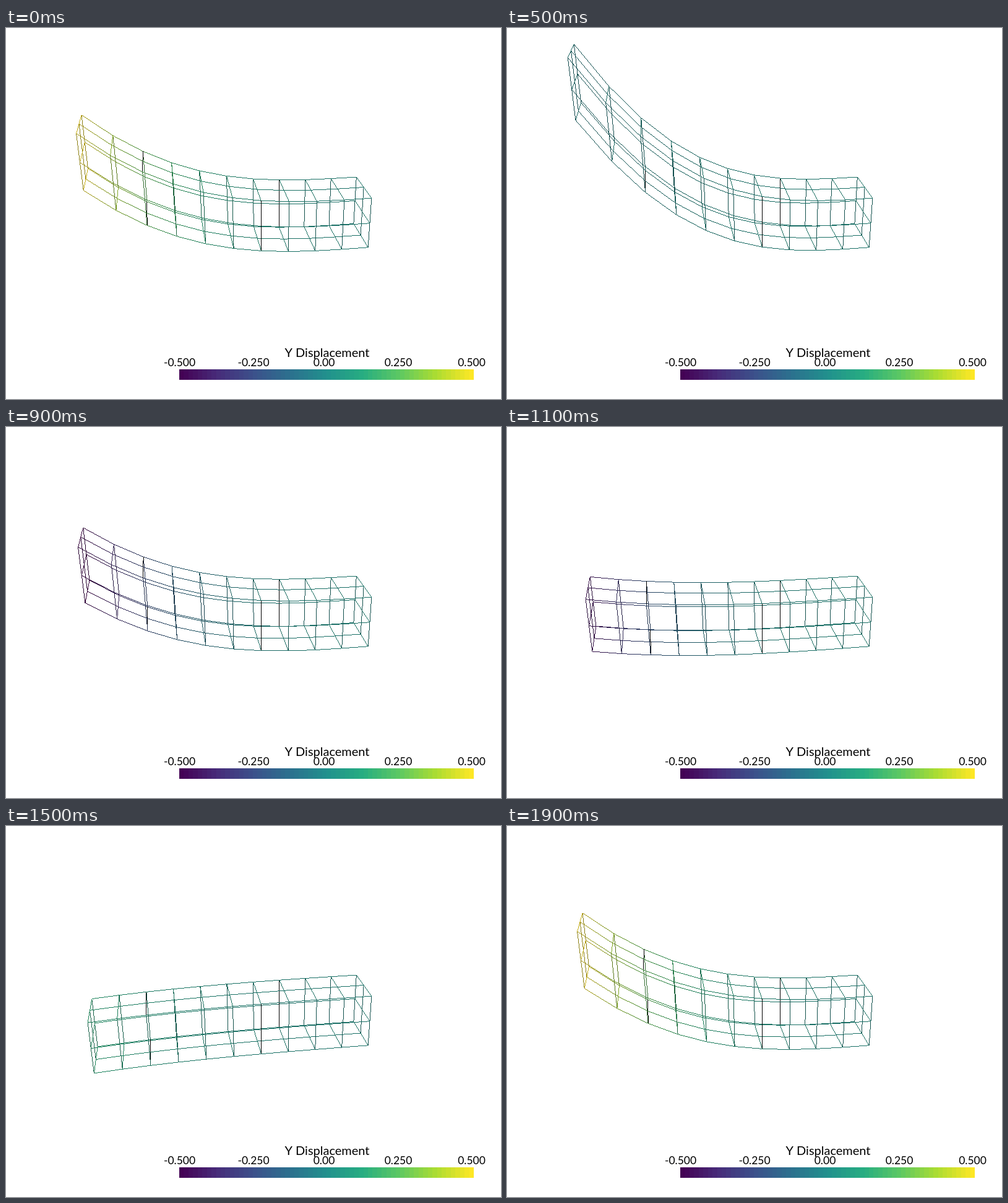
These frames come from a looping animation (800 px wide and 600 px high, 2000 ms). An HTML page with a canvas:

```html
<!DOCTYPE html>
<html lang="en">
<head>
<meta charset="utf-8">
<title>Beam displacement</title>
<style>
  html, body { margin: 0; width: 100%; height: 100%; overflow: hidden; background: #fff; }
  canvas { display: block; }
</style>
</head>
<body>
<canvas id="stage" width="800" height="600"></canvas>
<script>
const ctx = document.getElementById('stage').getContext('2d');
const W = 800, VIEW_H = 500;
const STEPS = 20, STEP_MS = 100;

const dot = (a, b) => a[0] * b[0] + a[1] * b[1] + a[2] * b[2];
const sub = (a, b) => a.map((v, i) => v - b[i]);
const unit = a => a.map(v => v / Math.hypot(...a));
const cross = (a, b) => [
  a[1] * b[2] - a[2] * b[1],
  a[2] * b[0] - a[0] * b[2],
  a[0] * b[1] - a[1] * b[0]
];

// Camera
const eye = [11.9151, 6.1139, 3.6125];
const forward = unit(sub([0, 0.375, 2], eye));
const right = unit(cross(forward, [-0.42546, 0.90242, -0.0679]));
const up = cross(right, forward);
const focal = 300 / Math.tan(Math.PI / 12);

function project(p) {
  const d = sub(p, eye);
  const cam = [dot(d, right), dot(d, up), -dot(d, forward)];
  const k = focal / -cam[2];
  return { cam, u: 400 + cam[0] * k, v: 300 - cam[1] * k };
}

// Viridis
const stops = [
  [68, 1, 84], [71, 44, 122], [59, 81, 139], [44, 113, 142], [33, 144, 141],
  [39, 173, 129], [92, 200, 99], [170, 220, 50], [253, 231, 37]
];
function viridis(t) {
  const x = Math.min(1, Math.max(0, t)) * (stops.length - 1);
  const i = Math.min(stops.length - 2, Math.floor(x));
  return stops[i].map((c, j) => c + (stops[i + 1][j] - c) * (x - i));
}

// Key, head and fill lights in camera space
const lights = [
  { dir: [0.112, 0.766, 0.633], tint: [0.75, 0.72, 0.64] },
  { dir: [0, 0, 1], tint: [0.25, 0.25, 0.25] },
  { dir: [0, -0.966, 0.259], tint: [0.23, 0.24, 0.25] }
];
function shade(a, b) {
  if (Math.abs(a.u - b.u) < 0.3) return [0, 0, 0];
  const [x, y, z] = unit(sub(b.cam, a.cam));
  const n = unit([-x * z, -y * z, x * x + y * y]);
  return [0, 1, 2].map(c =>
    lights.reduce((s, l) => s + Math.max(0, dot(n, l.dir)) * l.tint[c], 0));
}

// Beam of 2 x 2 x 10 cells; only edges on its surface are drawn
const SIDE = 2, LENGTH = 10;
const id = (i, j, k) => (k * 3 + j) * 3 + i;
const nodes = [], edges = [];
for (let k = 0; k <= LENGTH; k++)
  for (let j = 0; j <= SIDE; j++)
    for (let i = 0; i <= SIDE; i++) {
      nodes.push([i / 2, j / 2, k / 2]);
      const n = id(i, j, k);
      const cap = k === 0 || k === LENGTH;
      if (i < SIDE && (cap || j !== 1)) edges.push([n, id(i + 1, j, k)]);
      if (j < SIDE && (cap || i !== 1)) edges.push([n, id(i, j + 1, k)]);
      if (k < LENGTH && (i !== 1 || j !== 1)) edges.push([n, id(i, j, k + 1)]);
    }

// Hard one-pixel line with a colour ramp
function line(img, a, b) {
  const steep = Math.abs(b.v - a.v) > Math.abs(b.u - a.u);
  const [m, s] = steep ? ['v', 'u'] : ['u', 'v'];
  if (a[m] > b[m]) [a, b] = [b, a];
  const light = shade(a, b);
  for (let p = Math.ceil(a[m] - 0.5); p + 0.5 < b[m]; p++) {
    const t = (p + 0.5 - a[m]) / (b[m] - a[m]);
    const q = Math.floor(a[s] + (b[s] - a[s]) * t);
    const [x, y] = steep ? [q, p] : [p, q];
    if (x < 0 || y < 0 || x >= W || y >= VIEW_H) continue;
    const o = (y * W + x) * 4;
    for (let c = 0; c < 3; c++)
      img.data[o + c] = (a.rgb[c] + (b.rgb[c] - a.rgb[c]) * t) * light[c];
  }
}

function drawBeam(step) {
  const turn = 2 * Math.PI / (STEPS - 1);
  const wave = Math.cos(step * turn);
  // running sum of the cosine steps
  const sway = 2.5 + Math.sin((step + 0.5) * turn) / (2 * Math.sin(turn / 2));
  const points = nodes.map(([x, y, z]) => {
    const d = z ** 3 / 250;
    return { ...project([x, y + d * sway, z]), rgb: viridis(0.5 + d * wave) };
  });
  const img = ctx.createImageData(W, VIEW_H);
  img.data.fill(255);
  for (const [a, b] of edges) line(img, points[a], points[b]);
  ctx.putImageData(img, 0, 0);
}

function drawLegend() {
  ctx.fillStyle = '#fff';
  ctx.fillRect(0, VIEW_H, W, 600 - VIEW_H);
  const bands = 64, left = 280, width = 476;
  for (let i = 0; i < bands; i++) {
    const x0 = Math.round(left + width * i / bands);
    const x1 = Math.round(left + width * (i + 1) / bands);
    ctx.fillStyle = `rgb(${viridis(i / (bands - 1)).map(Math.round)})`;
    ctx.fillRect(x0, 552, x1 - x0, 17);
  }
  ctx.fillStyle = '#000';
  ctx.textAlign = 'center';
  ctx.font = '20px Lato, sans-serif';
  ctx.fillText('Y Displacement', 519, 532);
  ctx.font = '17.5px Lato, sans-serif';
  const labels = [['-0.500', 280.5], ['-0.250', 400], ['0.00', 514], ['0.250', 634], ['0.500', 752.5]];
  for (const [text, x] of labels) ctx.fillText(text, x, 547);
}

let shown = -1;
function tick() {
  const step = Math.floor(performance.now() / STEP_MS) % STEPS;
  if (step !== shown) {
    drawBeam(step);
    drawLegend();
    shown = step;
  }
  requestAnimationFrame(tick);
}
tick();
</script>
</body>
</html>
```
